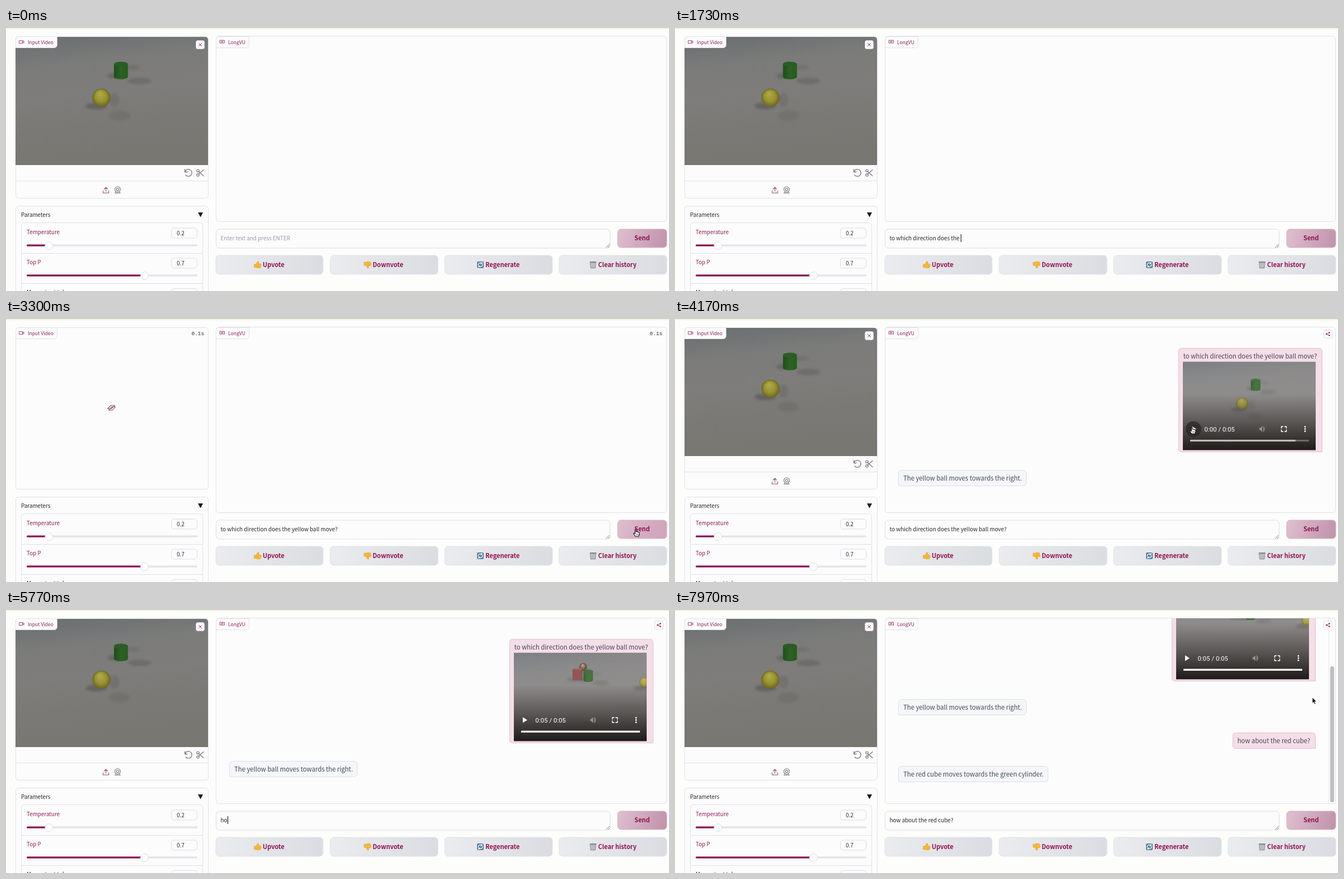
An HTML page with a canvas for the animation above (8000 ms loop, 1188 by 472 pixels).

```html
<!DOCTYPE html>
<html lang="en">
<head>
<meta charset="utf-8">
<title>Video chat demo</title>
<style>
html, body { margin: 0; width: 100%; height: 100%; overflow: hidden; background: #fdfdfc; }
canvas { display: block; }
</style>
</head>
<body>
<canvas id="stage" width="1188" height="472"></canvas>
<script>
const c = document.getElementById('stage').getContext('2d');
const LOOP = 8000, CHAR = 47.5;
const SANS = '"Noto Sans CJK JP","Noto Sans CJK SC","Noto Sans CJK","Source Sans Pro","Open Sans",sans-serif';
const MONO = '"Liberation Mono",monospace', ROBOTO = 'Roboto,sans-serif';
const WINE = '#8c1c55', INK = '#27272a', EDGE = '#e1e0ec', PAPER = '#fcfcfc', GRAY = '#77727f', PINK = '#f4dee8';
const ASK1 = 'to which direction does the yellow ball move?', ASK2 = 'how about the red cube?';
const T = { type1: 400, send1: 3200, reply1: 3680, play: 4220, end: 5450, clear: 5600, type2: 5630, send2: 6970, reply2: 7450 };

const clamp = v => Math.max(0, Math.min(1, v));
const mix = (a, b, p) => a + (b - a) * p;
const ease = p => p * p * (3 - 2 * p);
const span = (t, a, b) => clamp((t - a) / (b - a));

function paint(fill, stroke, w = 1) {
  if (fill) { c.fillStyle = fill; c.fill(); }
  if (stroke) { c.strokeStyle = stroke; c.lineWidth = w; c.stroke(); }
}
function box(x, y, w, h, r, fill, stroke) {
  c.beginPath(); c.roundRect(x, y, w, h, r); paint(fill, stroke);
}
function oval(x, y, rx, ry, fill, stroke, w) {
  c.beginPath(); c.ellipse(x, y, rx, ry, 0, 0, 7); paint(fill, stroke, w);
}
function shape(d, x, y, fill, stroke, w) {
  const p = new Path2D(d);
  c.save(); c.translate(x, y); c.lineJoin = c.lineCap = 'round';
  if (fill) { c.fillStyle = fill; c.fill(p); }
  if (stroke) { c.strokeStyle = stroke; c.lineWidth = w || 1; c.stroke(p); }
  c.restore();
}
function text(s, x, y, size, color, font = SANS, weight = 400) {
  c.font = `${weight} ${size}px ${font}`;
  c.fillStyle = color;
  c.fillText(s, x, y);
}
function grad(x0, y0, x1, y1, ...stops) {
  const g = c.createLinearGradient(x0, y0, x1, y1);
  stops.forEach((s, i) => g.addColorStop(i / (stops.length - 1), s));
  return g;
}
function ball(x, y, r, light, mid, dark) {
  const g = c.createRadialGradient(x - r * .15, y - r * .45, r * .1, x, y, r);
  g.addColorStop(0, light); g.addColorStop(.6, mid); g.addColorStop(1, dark);
  oval(x, y, r, r, g);
}
function shadow(x, y, rx, ry, a) {
  c.save(); c.filter = 'blur(2px)';
  oval(x, y, rx, ry, `rgba(45,43,40,${a})`);
  c.restore();
}

// Tabletop clip in a 345 x 230 space; p runs from 0 to 1
function scene(p) {
  c.fillStyle = grad(0, 0, 25, 230, '#686e70', '#7b7b7a', '#7e7d7b', '#7b7975', '#787772');
  c.fillRect(0, 0, 345, 230);
  const roll = ease(span(p, .08, .9)), slide = 1 - (1 - span(p, .1, .75)) ** 2;
  const gx = 189 + 4 * span(p, .65, .8);
  if (p > .1) {
    const sx = mix(310, 180, slide), sy = mix(-15, 37, slide);
    shadow(sx + 8, sy + 9, 14, 4, .25);
    ball(sx, sy, 10, '#b39a80', '#6c4c36', '#37291f');
  }
  shadow(gx - 13, 70, 11, 5, .25);
  shadow(gx + 33, 79, 21, 6, .18);
  shadow(gx + 22, 55, 12, 4, .13);
  c.fillStyle = grad(gx - 13, 0, gx + 13, 0, '#204b1a', '#2b6323', '#28591f');
  c.beginPath(); c.ellipse(gx, 49, 12.5, 4.5, 0, Math.PI, 0); c.ellipse(gx, 71.5, 12.5, 4.5, 0, 0, Math.PI); c.fill();
  oval(gx, 49, 12.5, 4.3, '#2b5c25');
  if (p > .1) {
    const x = mix(-35, 152, slide), y = mix(62, 41, slide);
    shadow(x + 6, y + 29, 20, 5, .25);
    shape('M0 3L4 0H26L24 4V31H1Z', x, y, '#843c3d');
    shape('M0 3L4 0H26L24 4Z', x, y, '#995052');
    shape('M24 4L26 0V27L24 31Z', x, y, '#642c2e');
  }
  const bx = mix(154, 339, roll), by = mix(109, 77, roll), r = mix(16.3, 13.5, roll);
  shadow(bx - 9, by + 15, 19, 6, .3);
  shadow(bx + 23, by + 4, 9, 12, .13);
  shadow(bx + 32, by + 32, 19, 9, .1);
  ball(bx, by, r, '#b0a94a', '#98912f', '#6a6423');
}

function tag(x, w, label) {
  box(x + .5, 15.5, w, 20, [5, 0, 5, 0], PAPER, EDGE);
  text(label, x + 22, 28.7, 8.6, WINE);
}
function inputVideo(busy, secs) {
  box(17.5, 15.5, 345, 290, 5, PAPER, EDGE);
  if (busy) {
    text(secs, 332.5, 28.5, 9.4, INK, MONO);
    shape('M-7 2L-1 -4H6L0 2ZM-5 4.5L1 -1.5H7L2 4.5Z', 189, 159, null, '#8c4b68', 1.1);
  } else {
    c.save();
    c.beginPath(); c.roundRect(17, 16, 345, 230, [5, 5, 0, 0]); c.clip();
    c.translate(17, 16); scene(0);
    c.restore();
    c.fillStyle = EDGE; c.fillRect(17, 274, 345, 1);
    box(340.5, 22.5, 15, 15, 3, '#fdfdfd', '#d9d6dd');
    shape('M-2.5 -2.5L2.5 2.5M2.5 -2.5L-2.5 2.5', 348, 30, null, WINE, .9);
    shape('M-6.5 -6V-1.5H-2M-6.3 -1.7A6.3 6.3 0 1 1 -5 4', 327, 260, null, GRAY, 1.3);
    shape('M-3 -2.2L6 5.5M-3 2.2L6 -5.5', 348, 260, null, GRAY, 1.2);
    oval(344, 256.2, 2.2, 2.2, null, GRAY, 1.2);
    oval(344, 263.8, 2.2, 2.2, null, GRAY, 1.2);
    shape('M0 2V-5M-3 -2L0 -5L3 -2M-5 1V5H5V1', 179, 291, null, '#8c4b6c', 1.1);
    oval(200, 289.7, 5, 5, null, GRAY, 1.1);
    oval(200, 289.7, 2.2, 2.2, null, GRAY, 1.1);
    shape('M-3 4L-5 6.3H5L3 4', 200, 290, null, GRAY, 1);
  }
  tag(17, 74, 'Input Video');
  shape('M-4 -2.5H1.5V2.5H-4ZM1.5 -.7L4 -2V2L1.5 .7', 28, 25, null, WINE, .8);
}

function slider(y, label, value, x) {
  text(label, 37, y, 9.9, WINE);
  box(296.5, y - 11, 46, 18, 5, PAPER, '#dddde5');
  text(value, 306, y + 1.6, 9.8, INK);
  box(37, y + 18.5, 306, 3.2, 1.6, '#e3e3e7');
  box(37, y + 18.5, x - 37, 3.2, 1.6, '#8b1457');
  oval(x, y + 20.7, 7, 7, '#fdfdfd', '#dfdfe4');
}
function parameters() {
  box(17.5, 319.5, 345, 170, 5, PAPER, EDGE);
  text('Parameters', 27, 338.7, 9.9, INK);
  shape('M-4.5 -4H4.5L0 4.5Z', 348.5, 335, '#18181b');
  box(27.5, 349.5, 325, 150, 5, PAPER, EDGE);
  slider(370, 'Temperature', '0.2', 77);
  slider(424, 'Top P', '0.7', 248);
  c.fillStyle = EDGE; c.fillRect(28, 404, 324, 1); c.fillRect(28, 458, 324, 1);
  text('Max output tokens', 37, 478, 9.9, INK);
  box(296.5, 467.5, 46, 18, 5, PAPER, '#dddde5');
}

const THUMB = 'M-6 -1H-3L0 -6Q2.5 -6.5 2 -3.5L1.5 -1.5H5Q6.5 -1 6 .5Q6.5 1.5 5.7 2.3Q6 3.6 5 4.2Q5 5.6 3.5 5.6H-1L-3 4.6H-6Z';
const icons = {
  up: () => shape(THUMB, 0, 0, '#f7b732', '#d79224', .6),
  down() { c.scale(1, -1); icons.up(); },
  redo() {
    box(-6, -6, 12, 12, 2, '#58839f');
    shape('M-3.7 .5A3.8 3.8 0 0 1 2.8 -2.5M3.7 -.5A3.8 3.8 0 0 1 -2.8 2.5M3 -4.7V-2H.5M-3 4.7V2H-.5', 0, 0, null, '#fff', 1.2);
  },
  bin() {
    shape('M-5 -4.5H5L4 6H-4Z', 0, 0, '#a8abb0', '#777b80', .7);
    shape('M-2.5 -3L-2 5M0 -3V5M2.5 -3L2 5M-4.5 -1H4.5M-4 2H4', 0, 0, null, '#d5d7da', .6);
    box(-6, -6, 12, 2, 1, '#85898e');
  }
};
function button(x, w, label, icon, tx) {
  box(x, 408, w, 34, 6, grad(x, 408, x + w, 442, '#ebecef', '#e2e4e8', '#d9dce0'), '#e0e2e8');
  c.save(); c.translate(tx - 9, 425); icons[icon](); c.restore();
  text(label, tx, 429, 11, '#92144f', SANS, 700);
}
function controls(typed, caret, hover) {
  box(376.5, 361, 706, 34, 6, PAPER, '#dddce8');
  text(typed || 'Enter text and press ENTER', 384.5, 380.8, 9.92, typed ? INK : '#9a9aa3');
  if (caret) {
    c.fillStyle = '#000';
    c.fillRect(Math.round(384.8 + c.measureText(typed).width), 370, 1, 14);
  }
  shape('M0 6L6 0M3.5 6L6 3.5', 1075.5, 388, null, '#666', .9);
  box(1096, 361, 88, 33, 6, hover
    ? grad(1096, 361, 1184, 394, '#dfbfd0', '#d5acc2', '#d0a4bb')
    : grad(1096, 361, 1184, 394, '#dfc0d0', '#cfa9bd', '#bf91a9'), '#d3b3c4');
  text('Send', 1126, 381.2, 11.1, '#92144f', SANS, 700);
  button(376, 192, 'Upvote', 'up', 460);
  button(581, 193, 'Downvote', 'down', 657);
  button(786, 193, 'Regenerate', 'redo', 859);
  button(991, 193, 'Clear history', 'bin', 1061);
}

function player(x, y, p, playing, hover) {
  c.save();
  c.translate(x, y);
  c.beginPath(); c.rect(0, 0, 238, 159); c.clip();
  c.save(); c.scale(.69, .692); scene(p); c.restore();
  c.fillStyle = 'rgba(255,248,255,.13)'; c.fillRect(0, 0, 238, 159);
  c.fillStyle = grad(0, 58, 0, 159, 'rgba(15,12,10,0)', 'rgba(15,12,10,.4)', 'rgba(15,12,10,.88)');
  c.fillRect(0, 58, 238, 101);
  if (hover) oval(19, 121, 14, 14, 'rgba(40,38,40,.75)');
  if (playing) { c.fillStyle = '#fff'; c.fillRect(16, 116, 3, 10); c.fillRect(21, 116, 3, 10); }
  else shape('M0 0L8 5.2L0 10.4Z', 16, 115.7, '#fff');
  text(`0:0${Math.floor(p * 5)} / 0:05`, 38.5, 125, 11.45, '#fff', ROBOTO);
  shape('M-5 -2H-3L0 -5V5L-3 2H-5Z', 142, 121, '#98928f');
  shape('M2 -2Q3.5 0 2 2M2 -4.5Q7 0 2 4.5', 142, 121, null, '#98928f', 1.2);
  shape('M-4.5 -1.5V-4.5H-1.5M1.5 -4.5H4.5V-1.5M4.5 1.5V4.5H1.5M-1.5 4.5H-4.5V1.5', 181, 121, null, '#fff', 1.5);
  for (const d of [-4, 0, 4]) oval(219, 121 + d, 1.4, 1.4, '#fff');
  box(13, 140.3, 213, 3, 1, 'rgba(255,255,255,.3)');
  box(13, 140.3, p ? 213 : 189, 3, 1, 'rgba(255,255,255,.6)');
  if (p) box(13, 140.3, 213 * p, 3, 1, '#fff');
  c.restore();
}
function userBubble(x, y, w, h, s) {
  box(x + .5, y + .5, w, h, [5, 5, 0, 5], PINK, '#e6bfd0');
  text(s, x + 8.7, y + 18.5, 11.33, '#4a4652');
}
function botBubble(y, w, s) {
  box(400.5, y + .5, w, 28, [6, 6, 6, 0], '#f4f6f8', '#dcdfeb');
  text(s, 409, y + 18.7, 11.33, '#444b57');
}
function chat(t, busy, secs) {
  const answered = t >= T.reply1, second = t >= T.send2, done = t >= T.reply2;
  const shift = second ? -12 : 0;
  const scroll = 111 * ease(span(t, T.reply2, T.reply2 + 120));
  box(376.5, 14.5, 807, 333, 5, PAPER, EDGE);
  c.save();
  c.beginPath(); c.rect(377, 15, 806, 332); c.clip();
  if (answered) {
    c.save();
    c.translate(0, -scroll);
    userBubble(902 + shift, 52, 257, 186, ASK1);
    player(910 + shift, 76.5, span(t, T.play, T.end), t > T.play && t < T.end, t > 4080 && t < 4420);
    botBubble(271, 229, 'The yellow ball moves towards the right.');
    if (done) {
      userBubble(999, 331, 148, 28, ASK2);
      botBubble(391, 268, 'The red cube moves towards the green cylinder.');
    }
    c.restore();
  }
  if (second) {
    if (!done) {
      box(376.5, 308, 795, 60, 16, PINK);
      [762.5, 774, 785].forEach((x, i) => {
        const lit = clamp(.55 + Math.sin((t - 7020) / 90 - i * 1.2) * .9);
        const a = t < 7110 ? [1, 1, .12][i] : Math.max(.12, lit);
        oval(x, 333, 2.9, 2.9, `rgba(24,20,28,${a})`);
      });
    }
    c.fillStyle = '#e9e9ee'; c.fillRect(1171, 15, 1, 333);
    box(1174, done ? 35 + scroll * .595 : 35, 7, done ? 244 : 287, 3.5, '#bfbfc1');
  }
  c.restore();
  tag(376, 59, 'LongVU');
  shape('M-4 -3H4V2H1L0 3L-1 2H-4ZM-2 -1.2H2M-2 .4H1', 387.5, 25, null, WINE, .8);
  if (busy) text(secs, 1153.5, 28.5, 9.4, INK, MONO);
  else if (answered) {
    box(1162.5, 19.5, 15, 15, 3, '#fdfdfd', '#dddbe2');
    shape('M2.5 -2.5L-2.5 0L2.5 2.5', 1170, 27, null, WINE, .8);
    for (const [x, y] of [[2.5, -2.5], [-2.5, 0], [2.5, 2.5]]) oval(1170 + x, 27 + y, 1.3, 1.3, WINE);
  }
}

// Pointer stops: time, x, y
const route = [
  [2600, 450, 378], [3080, 1128, 377], [3700, 1128, 377], [4120, 926, 193], [4320, 926, 193],
  [4600, 860, 250], [5050, 860, 250], [5400, 450, 378], [T.type2, 450, 378],
  [6720, 450, 378], [6930, 1145, 378], [7480, 1145, 378], [7800, 1142, 157], [LOOP, 1142, 157]
];
function pointer(t) {
  if (t < 2600 || (t > T.type2 && t < 6720)) return null;
  const i = route.findIndex(s => s[0] > t), a = route[i - 1], b = route[i];
  const p = ease(span(t, a[0], b[0]));
  return [mix(a[1], b[1], p), mix(a[2], b[2], p)];
}
function drawPointer([x, y], t) {
  const overSend = x > 1096 && y > 361 && y < 394, overPlay = t > 4080 && t < 4420;
  if (overSend || overPlay) {
    shape('M-.8 1Q0 -.5 1 1V5L2.4 4.4L3.6 5.2L5 5L6 6.2L7 6V9.5L5.7 13H-.2L-3.5 8.5Q-3.6 7 -2 7.4L-.8 8.7Z', x, y, '#fff', '#111', 1.1);
    shape('M1.5 8.3V11M3.4 8.3V11M5.1 8.3V11', x, y, null, '#333', .6);
  } else if (x < 1083 && y > 361 && y < 395) {
    shape('M-2 -6Q0 -6 0 -4Q0 -6 2 -6M0 -4V4M-2 6Q0 6 0 4Q0 6 2 6', x, y, null, '#222', 1);
  } else {
    shape('M0 0V10.5L2.4 8.3L4.2 12.3L6 11.5L4.3 7.7H7.5Z', x, y, '#111', '#fff', .8);
  }
}

function frame(now) {
  const t = now % LOOP;
  const typing2 = t >= T.clear;
  const full = typing2 ? ASK2 : ASK1, start = typing2 ? T.type2 : T.type1;
  const typed = full.slice(0, Math.max(0, Math.floor((t - start) / CHAR)));
  const load1 = t >= T.send1 && t < T.reply1, load2 = t >= T.send2 && t < T.reply2;
  const busy = load1 || load2;
  const secs = ((t - (load2 ? T.send2 : T.send1)) / 1000).toFixed(1) + 's';
  const mouse = pointer(t);
  const caret = typed && (t < 2700 || (typing2 && t < 6850));
  c.fillStyle = '#fdfdfc'; c.fillRect(0, 0, 1188, 472);
  c.fillStyle = '#f2f4df'; c.fillRect(0, 0, 1188, 2);
  inputVideo(busy, secs);
  parameters();
  chat(t, busy, secs);
  controls(typed, caret, mouse && mouse[0] > 1096 && mouse[1] > 361);
  if (mouse) drawPointer(mouse, t);
}
const t0 = performance.now();
(function tick() {
  frame(performance.now() - t0);
  requestAnimationFrame(tick);
})();
</script>
</body>
</html>
```
